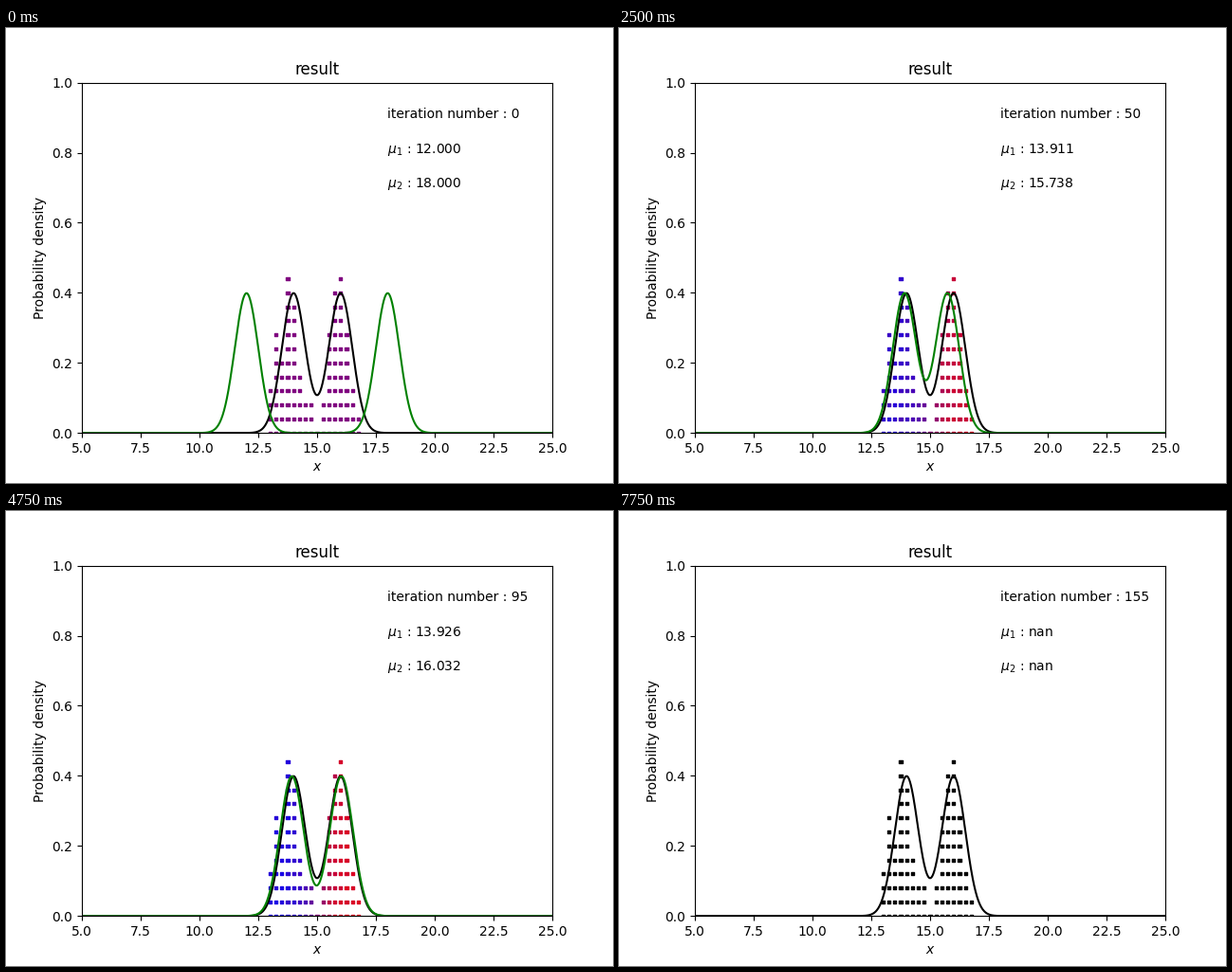
Recreate the animation shown at these times as a matplotlib script. Size 640 by 480 pixels, loop 8 s.

```python
import numpy as np
import matplotlib.pyplot as plt
from matplotlib.animation import FuncAnimation

FRAMES = 32
STEP = 5          # sampler iterations per frame
INTERVAL = 250
SIGMA = 0.5

# Stacked dots: one column per histogram bin
counts = [4, 8, 6, 12, 10, 5, 3, 3, 1, 3, 8, 11, 12, 8, 4, 2]
bins = 13 + 0.25 * np.arange(len(counts))
dot_x = np.repeat(bins, counts)
dot_y = 0.04 * np.concatenate([np.arange(n) for n in counts])

# Sampler path: known states, with a little wander between them
rng = np.random.default_rng(4)
key_iter = [0, 30, 50, 70, 95, 115, 135, 150]
key_mu1 = [12.000, 13.597, 13.911, 13.988, 13.926, 13.853, 13.930, 13.910]
key_mu2 = [18.000, 16.329, 15.738, 15.819, 16.032, 15.970, 15.940, 15.960]
iters = STEP * np.arange(FRAMES)


def chain(keys):
    path = np.interp(iters, key_iter, keys)
    wander = rng.normal(0, 0.025, FRAMES)
    path += np.where(np.isin(iters, key_iter), 0, wander)
    path[-1] = np.nan      # the sampler breaks down at the end
    return path


mu1, mu2 = chain(key_mu1), chain(key_mu2)

# Long-run share of the right-hand cluster for each dot
share = 1 / (1 + np.exp(-2.5 * (dot_x - 15)))
noise = rng.normal(0, 0.06, dot_x.size)


def mixture(x, a, b):
    def bell(m):
        return np.exp(-0.5 * ((x - m) / SIGMA) ** 2)
    return 0.5 * (bell(a) + bell(b)) / (SIGMA * np.sqrt(2 * np.pi))


def dot_colors(n):
    rgb = np.zeros((dot_x.size, 3))
    if n == iters[-1]:
        return rgb
    fade = 1 / (1 + n / 30)
    red = share + (0.5 - share) * fade + noise * fade * (1 - fade) * 2
    red = np.clip(red, 0, 1)
    rgb[:, 0], rgb[:, 2] = red, 1 - red
    return rgb


fig, ax = plt.subplots(figsize=(6.4, 4.8), dpi=100)
ax.set(xlim=(5, 25), ylim=(0, 1), title="result",
       xlabel="$x$", ylabel="Probability density")

x = np.linspace(5, 25, 1000)
dots = ax.scatter(dot_x, dot_y, s=5, marker="s", c=dot_colors(0))
ax.plot(x, mixture(x, 14, 16), color="black")
fit, = ax.plot(x, mixture(x, mu1[0], mu2[0]), color="green")
labels = [ax.text(18, y, "") for y in (0.9, 0.8, 0.7)]


def update(i):
    dots.set_color(dot_colors(iters[i]))
    fit.set_ydata(mixture(x, mu1[i], mu2[i]))
    labels[0].set_text(f"iteration number : {iters[i]}")
    labels[1].set_text(rf"$\mu_1$ : {mu1[i]:.3f}")
    labels[2].set_text(rf"$\mu_2$ : {mu2[i]:.3f}")
    return [dots, fit, *labels]


anim = FuncAnimation(fig, update, frames=FRAMES, interval=INTERVAL,
                     repeat=True, repeat_delay=0)
plt.show()
```
